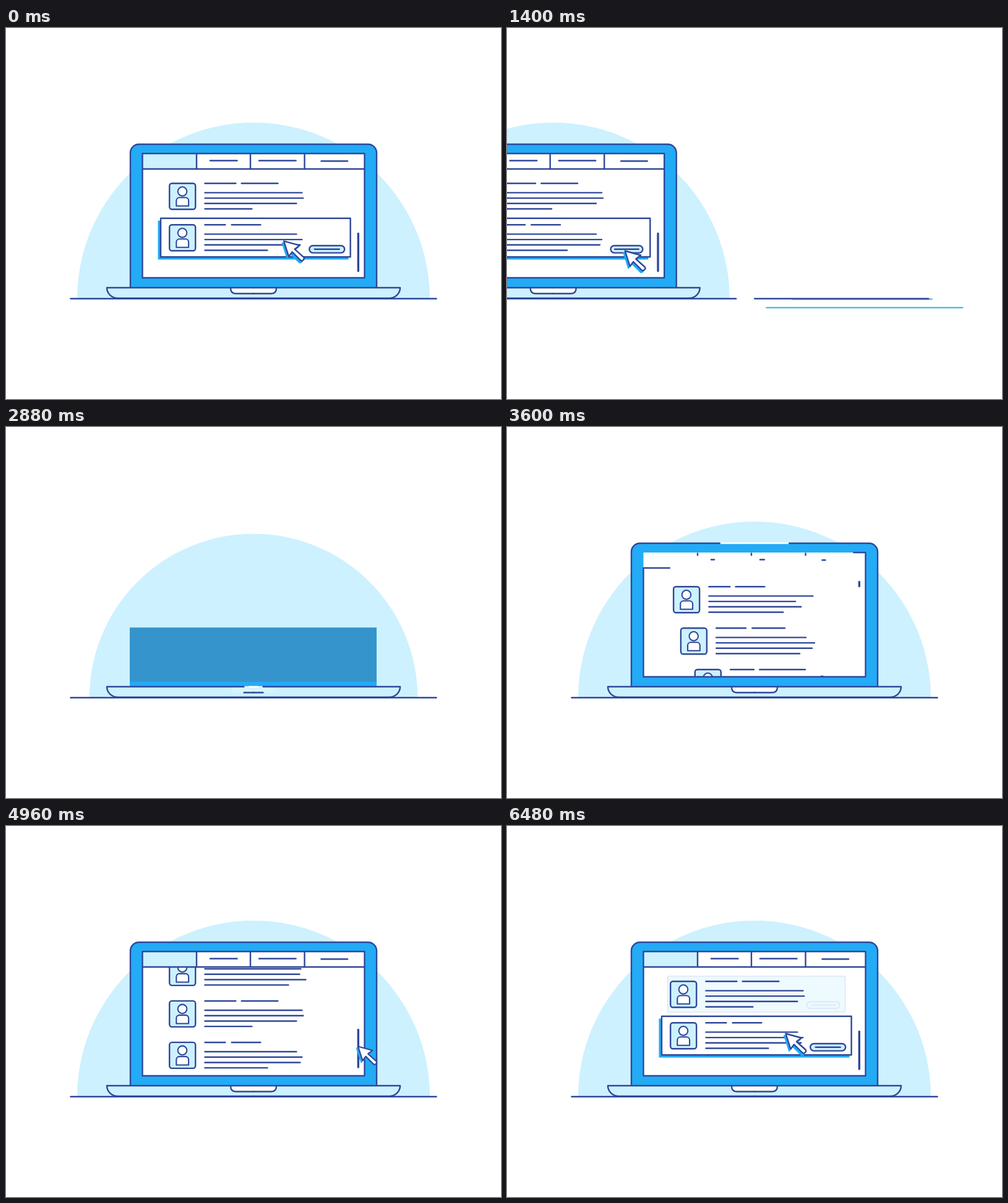
An HTML page with a canvas for the animation above (6.52 s loop, 800 px wide and 600 px high).

```html
<!DOCTYPE html>
<html lang="en">
<head>
<meta charset="utf-8">
<title>Laptop list</title>
<style>
html, body { margin: 0; width: 100%; height: 100%; overflow: hidden; background: #fff; }
canvas { display: block; }
</style>
</head>
<body>
<canvas id="stage" width="800" height="600"></canvas>
<script>
const ctx = document.getElementById('stage').getContext('2d');
const LOOP = 6520;
const INK = '#2f4899', BLUE = '#23abf6', PALE = '#cdf1fe', TRAIL = '#55bfe6', BACK = '#3694cc';
const ROW = 67;

// Right ends of the text lines: two title parts, then four body rows
const ITEMS = [
  { title: [356, 364, 412], body: [490, 462, 471, 442] },
  { title: [370, 379, 433], body: [467, 481, 477, 457] },
  { title: [360, 368, 443], body: [477, 475, 485, 457] },
  { title: [372, 380, 440], body: [479, 481, 470, 398] },
  { title: [355, 364, 412], body: [470, 479, 476, 423] }
];

const lerp = (a, b, p) => a + (b - a) * p;
const span = (t, start, length) => Math.min(1, Math.max(0, (t - start) / length));
const outQuad = p => 1 - (1 - p) ** 2;
const outCubic = p => 1 - (1 - p) ** 3;
const inOutQuad = p => p < 0.5 ? 2 * p * p : 1 - 2 * (1 - p) ** 2;
const inOutCubic = p => p < 0.5 ? 4 * p ** 3 : 1 - 4 * (1 - p) ** 3;

function hermite(a, b, va, vb, s) {
  const r = 1 - s;
  return a * (1 + 2 * s) * r * r + b * s * s * (3 - 2 * s) + va * s * r * r - vb * s * s * r;
}

// Smooth curve through [time, value] keys, at rest at both ends
function follow(keys, t) {
  const last = keys.length - 1;
  if (t <= keys[0][0]) return keys[0][1];
  if (t >= keys[last][0]) return keys[last][1];
  let i = 0;
  while (t > keys[i + 1][0]) i++;
  const slope = k => k === 0 || k === last ? 0
    : (keys[k + 1][1] - keys[k - 1][1]) / (keys[k + 1][0] - keys[k - 1][0]);
  const [t0, a] = keys[i], [t1, b] = keys[i + 1], d = t1 - t0;
  return hermite(a, b, slope(i) * d, slope(i + 1) * d, (t - t0) / d);
}

function stroke(path, color = INK, width = 2.4) {
  ctx.strokeStyle = color;
  ctx.lineWidth = width;
  ctx.stroke(path);
}

function fill(path, color) {
  ctx.fillStyle = color;
  ctx.fill(path);
}

function line(x1, y1, x2, y2, width) {
  const p = new Path2D();
  p.moveTo(x1, y1);
  p.lineTo(x2, y2);
  stroke(p, INK, width);
}

function box(x, y, w, h, r = 0) {
  const p = new Path2D();
  p.roundRect(x, y, w, h, r);
  return p;
}

// Strokes only the part of a path between two lengths
function part(path, from, to, color = INK) {
  if (to - from < 0.5) return;
  ctx.setLineDash([to - from, 9999]);
  ctx.lineDashOffset = -from;
  stroke(path, color);
  ctx.setLineDash([]);
}

function measured(d) {
  const el = document.createElementNS('http://www.w3.org/2000/svg', 'path');
  el.setAttribute('d', d);
  return { path: new Path2D(d), length: el.getTotalLength() };
}

// Outline halves, each running from the bottom towards the top centre
const lidHalves = [
  measured('M201 419V202A14 14 0 0 1 215 188H400'),
  measured('M599 419V202A14 14 0 0 0 585 188H400')
];
const baseHalves = [
  measured('M400 437H181A18 17 0 0 1 163 420H400'),
  measured('M400 437H619A18 17 0 0 0 637 420H400')
];
const notchHalves = [
  measured('M400 429.5H371Q363 429.5 363 420'),
  measured('M400 429.5H429Q437 429.5 437 420')
];
const frame = measured('M220.5 228V404H579.5V203H220.5V228');
const baseShape = new Path2D('M163 420H637A18 17 0 0 1 619 437H181A18 17 0 0 1 163 420Z');
const notchShape = new Path2D('M363 420H437Q437 429.5 429 429.5H371Q363 429.5 363 420Z');
const pointer = new Path2D('M0 0L25.5 7L17.5 13L32 26Q34 28 31.5 30.5Q29 33 27 31L13.5 17.5L8 25Z');

const darkTrail = measured('M800 437.7H240A35 40 0 0 1 205 398V318' +
  'A96 118 0 0 0 109 201A95 99 0 0 0 14 300V390A48 48 0 0 0 62 437.7H696');
const paleTrail = measured('M800 452.3H229A37 42 0 0 1 192.5 410V290' +
  'A58.5 58 0 0 0 134 232.5A60 62 0 0 0 74 294V402A38 50 0 0 0 112 452.3H600');
const upperTrail = measured('M800 438.5H240');

function drawHalves(halves, p) {
  for (const h of halves) part(h.path, 0, h.length * p);
}

function drawItem(item, x, y) {
  ctx.save();
  ctx.translate(x, y);
  const photo = box(264.2, 251.2, 42, 42, 4);
  fill(photo, PALE);
  stroke(photo);
  const head = new Path2D();
  head.arc(285, 264.3, 7.3, 0, 7);
  const body = box(275.3, 274.2, 19.8, 13.6, [5, 5, 0, 0]);
  for (const p of [head, body]) {
    fill(p, '#fff');
    stroke(p, INK, 2.1);
  }
  line(321.5, 251.3, item.title[0] - 0.7, 251.3);
  line(item.title[1] + 0.7, 251.3, item.title[2] - 0.7, 251.3);
  item.body.forEach((end, i) => line(321.5, 266.4 + i * 8.7, end - 0.7, 266.4 + i * 8.7));
  ctx.restore();
}

function drawCard(cy, p, press) {
  if (p <= 0) return;
  ctx.save();
  ctx.globalAlpha = p;
  ctx.translate(403.3, cy);
  ctx.scale(lerp(0.93, 1, p), lerp(0.93, 1, p));
  fill(box(-154.3 - 3.5 * p, -32 + 4.5 * p, 308, 63, 0), BLUE);
  const card = box(-153.3, -31.2, 306.6, 62.4);
  fill(card, '#fff');
  stroke(card);
  ctx.translate(115.4, 18.8);
  const w = 57 * press;
  const button = box(-w / 2, -5.8, w, 11.6, 5.8);
  fill(button, PALE);
  stroke(button);
  line(-20 * lerp(1, press, 0.4), 0, 20 * lerp(1, press, 0.4), 0);
  ctx.restore();
}

function thumbTop(u) {
  return lerp(250.5, 332.5, inOutCubic(span(u, 4328, 800)));
}

function cursorAt(u) {
  const move = (a, b, start, length) => {
    const s = span(u, start, length);
    return [hermite(a[0], b[0], 0, 0, s), hermite(a[1], b[1], 0, 0, s)];
  };
  if (u < 4014) return move([489, 440], [568, 277], 3414, 600);
  if (u < 5480) return [568, thumbTop(u) + 26.5];
  if (u < 6080) return move([568, 359], [500, 265], 5480, 520);
  if (u < LOOP) {
    const s = span(u, 6080, 440);
    return [hermite(500, 448, 0, -4, s), hermite(265, 344, 0, 95, s)];
  }
  const s = span(u, LOOP, 520);
  return [hermite(448, 515, -5, 0, s), hermite(344, 360, 112, 0, s)];
}

function drawCursor(u) {
  if (u < 3414) return;
  ctx.save();
  if (u < 3800) ctx.clip(box(221, 203, 358, 201));
  const size = 1 - 0.08 * (span(u, 4100, 100) - span(u, 5300, 100));
  const [x, y] = cursorAt(u);
  ctx.translate(x + 1, y + 0.5);
  ctx.scale(size, size);
  ctx.save();
  ctx.translate(-2.5, 3);
  fill(pointer, BLUE);
  stroke(pointer, BLUE, 2);
  ctx.restore();
  fill(pointer, '#fff');
  stroke(pointer);
  ctx.restore();
}

function drawList(u) {
  ctx.save();
  ctx.clip(box(221, 229, 358, 175));
  const scroll = 208 * inOutCubic(span(u, 4430, 800));
  const press = 1 - 0.09 * outQuad(span(u, LOOP + 700, 140));
  drawCard(272, span(u, 5760, 200) - span(u, 6240, 260), 1);
  drawCard(339, span(u, 6240, 200), press);
  ITEMS.forEach((item, i) => {
    const x = 330 * (1 - outCubic(span(u, 3149 + 74 * i, 600)));
    drawItem(item, x, 7 + ROW * i - scroll);
  });
  ctx.restore();
}

function drawHeader(u) {
  const p = inOutQuad(span(u, 3500, 420));
  ctx.globalAlpha = span(u, 3700, 300);
  ctx.fillStyle = PALE;
  ctx.fillRect(221, 203, 87, 25);
  ctx.globalAlpha = 1;
  if (p > 0) {
    line(221.5, 228, lerp(221.5, 579, p), 228);
    for (const x of [308, 395, 482.5]) line(x, 204.5, x, lerp(204.5, 228, p));
    for (const [a, b, y] of [[330, 373.5, 214.5], [409, 468.5, 214.5], [509.5, 552, 215.3]])
      line(a, y, lerp(a, b, p), y);
    const top = thumbTop(u);
    line(569.3, top, 569.3, top + 60.5 * p, 3.4);
  }
}

function drawLid(u) {
  const open = inOutQuad(span(u, 2700, 400));
  if (open <= 0) return;
  const top = lerp(419, 188, open), r = 14 * span(open, 0.8, 0.2);
  fill(box(200, top, 399, 419 - top, [r, r, 0, 0]), BLUE);
  const shade = 1 - span(u, 2980, 140);
  if (shade > 0 && top < 412) {
    ctx.globalAlpha = shade;
    fill(box(200, top, 399, 412 - top, [r, r, 0, 0]), BACK);
    ctx.globalAlpha = 1;
  }
  const shown = outQuad(span(u, 3020, 180));
  if (shown > 0) {
    ctx.fillStyle = '#fff';
    ctx.fillRect(220.5, 404 - 201 * shown, 359, 201 * shown);
  }
  if (u > 3149) {
    drawList(u);
    drawHeader(u);
  }
  const edge = outQuad(span(u, 3240, 568));
  if (edge > 0 && edge < 1) {
    ctx.globalAlpha = span(u, 3240, 200);
    line2(344, 188, 456, 188, '#fff');
    ctx.globalAlpha = 1;
  }
  drawHalves(lidHalves, edge);
  part(frame.path, 0, frame.length * outQuad(span(u, 3240, 841)));
}

function line2(x1, y1, x2, y2, color) {
  const p = new Path2D();
  p.moveTo(x1, y1);
  p.lineTo(x2, y2);
  stroke(p, color);
}

function drawBase(u) {
  const p = inOutQuad(span(u, 2560, 368));
  if (p <= 0) return;
  ctx.globalAlpha = span(u, 2600, 200);
  fill(baseShape, PALE);
  ctx.globalAlpha = span(u, 2840, 200);
  fill(notchShape, '#fff');
  ctx.globalAlpha = 1;
  if (u > 2840 && p < 1) line2(393, 420, 407, 420, '#fff');
  drawHalves(baseHalves, p);
  drawHalves(notchHalves, inOutQuad(span(u, 2780, 240)));
}

function drawLaptop(u) {
  const slide = u > LOOP + 880 ? 17 * ((u - LOOP - 880) / 160) ** 2.5 : 0;
  ctx.save();
  ctx.translate(-slide, 0);
  const r = 285 * outCubic(span(u, 2400, 816));
  const dome = new Path2D();
  dome.arc(400, 438, r, Math.PI, 0);
  fill(dome, PALE);
  drawLid(u);
  drawBase(u);
  if (u > 2640) line(104.5, 437.7, 695.5, 437.7);
  drawCursor(u);
  ctx.restore();
}

function drawTrails(t) {
  if (t < 900 || t > 2700) return;
  part(upperTrail.path,
    follow([[900, 104], [1040, 42], [1200, 6], [1360, 40], [1600, 520]], t),
    follow([[900, 104], [1040, 92], [1360, 300], [1600, 520]], t), TRAIL);
  part(paleTrail.path,
    follow([[900, 110], [1040, 51], [1200, 6], [1360, 38], [1840, 413], [2680, paleTrail.length]], t),
    follow([[900, 110], [1040, 101], [1360, 340], [1840, 871], [2300, 1350], [2680, paleTrail.length]], t), TRAIL);
  part(darkTrail.path,
    follow([[900, 104], [1040, 93], [1360, 110], [1840, 280], [2640, darkTrail.length - 591]], t),
    follow([[900, 104], [1040, 130], [1360, 372], [1840, 707], [2600, darkTrail.length]], t));
}

function draw(t) {
  ctx.fillStyle = '#fff';
  ctx.fillRect(0, 0, 800, 600);
  ctx.lineCap = ctx.lineJoin = 'round';
  // The start of the loop carries on from its end
  const u = t < 2000 ? t + LOOP : t;
  if (t < 1660 || t > 2400) drawLaptop(u);
  drawTrails(t);
}

const begin = performance.now();
function tick() {
  draw((performance.now() - begin) % LOOP);
  requestAnimationFrame(tick);
}
tick();
</script>
</body>
</html>
```
